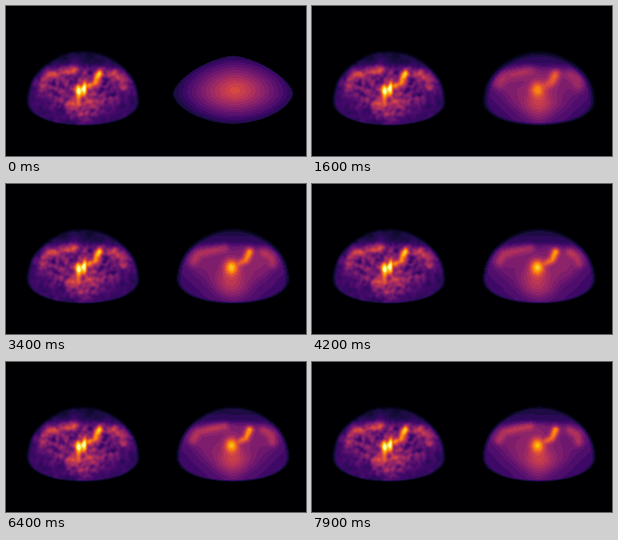
A matplotlib script for the animation above (8000 ms loop, 300 by 150 pixels).

```python
import numpy as np
import matplotlib.pyplot as plt
from matplotlib.animation import FuncAnimation

SIZE, FRAMES, STEP = 150, 80, 100
LEVELS = 26
MID = 77
X, Y = np.meshgrid(np.arange(SIZE) + 0.5, np.arange(SIZE) + 0.5)
FREQ2 = np.fft.fftfreq(SIZE)[:, None] ** 2 + np.fft.fftfreq(SIZE)[None, :] ** 2
inferno = plt.get_cmap("inferno")
rng = np.random.default_rng(12)


def blur(a, sigma):
    return np.fft.ifft2(np.fft.fft2(a) * np.exp(-2 * (np.pi * sigma) ** 2 * FREQ2)).real


def noise(sigma):
    n = blur(rng.standard_normal((SIZE, SIZE)), sigma)
    return n / n.std()


def sigmoid(a):
    return 1 / (1 + np.exp(-a))


def blob(x, y, sx, sy):
    return np.exp(-((X - x) / sx) ** 2 / 2 - ((Y - y) / sy) ** 2 / 2)


def ridge(points, width, first=1.0):
    """Soft stroke along a polyline, growing from `first` to full strength."""
    px, py = np.array(points, float).T
    knots = np.linspace(0, 1, len(px))
    dots = np.linspace(0, 1, 30)
    return np.max([(first + (1 - first) * s)
                   * blob(np.interp(s, knots, px), np.interp(s, knots, py), width, width)
                   for s in dots], axis=0)


def radius(cx, cy, w, up, down, p_up, p_down):
    """Normalised distance from the centre; the outline is at 1."""
    u = np.abs(X - cx) / w
    v = np.where(Y < cy, (cy - Y) / up, (Y - cy) / down)
    p = np.where(Y < cy, p_up, p_down)
    return (u ** p + v ** p) ** (1 / p)


def edge(r, slope):
    return np.clip((1 - r) * slope, 0, 1)


body = radius(MID, 95, 57.5, 51.5, 25, 1.95, 2.15)
lens = radius(MID, 87, 61, 38, 31.5, 1.5, 1.8)
peak = radius(MID + 4, 82, 62, 34, 37, 2, 2)

# Anatomy shared by both sides
rim = 0.2 - 0.07 * sigmoid((61 - Y) / 3)
cavity = sigmoid((1 - radius(MID, 75, 47, 14, 42, 2.4, 1.25)) * 9)
streak = ridge([(82, 80), (90, 76), (93.5, 68)], 2.6, 0.5)
bowel = np.maximum(ridge([(37, 78), (42, 70), (53, 67), (68, 64)], 3.2),
                   ridge([(108, 68), (115, 73), (117, 80)], 3.2))
sacrum = blob(MID - 1, 97, 10, 9)

# Detailed slice on the left
spine = sum(blob(75.5 + 3 * s, 83 - 1.2 * s, 2, 4.4) for s in (-1, 1))
scan = rim - 0.02 + 0.14 * cavity + 0.16 * sacrum + 0.22 * bowel
scan += 0.58 * np.maximum(spine, streak)
scan += noise(1.5) * (0.012 + 0.045 * cavity) + noise(3) * (0.008 + 0.025 * cavity)
scan *= edge(body, 12)

# Smooth field that the right side settles to
core = np.maximum(blob(75.5, 83, 4.6, 5), streak)
target = rim + 0.15 * cavity + 0.17 * sacrum + 0.15 * bowel + 0.47 * core
ripple = [noise(5) * cavity for _ in range(2)]
start = blur(0.1 + 0.53 * (1 - 0.45 * lens - 0.55 * peak), 3)


def fit(ms):
    early = np.exp(-ms / 400)
    field = blur(target, 5 * np.exp(-ms / 2200))
    field += 0.01 * (ripple[0] * np.sin(ms / 900) + ripple[1] * np.cos(ms / 1300))
    r = early * lens + (1 - early) * body
    value = early * np.maximum(start, 0.1) + (1 - early) * field
    return value * edge(r, 12 - 10 * np.exp(-ms / 2500) + 30 * early)


def picture(frame):
    right = np.round(fit(frame * STEP) * LEVELS) / LEVELS
    return inferno(np.clip(np.hstack([scan, right]), 0, 1))


fig = plt.figure(figsize=(3, 1.5), dpi=100, facecolor=inferno(0.0))
ax = fig.add_axes([0, 0, 1, 1])
ax.axis("off")
image = ax.imshow(picture(0), interpolation="nearest", aspect="auto")


def update(frame):
    image.set_data(picture(frame))
    return (image,)


anim = FuncAnimation(fig, update, frames=FRAMES, interval=STEP, repeat=True, repeat_delay=0)
plt.show()
```
